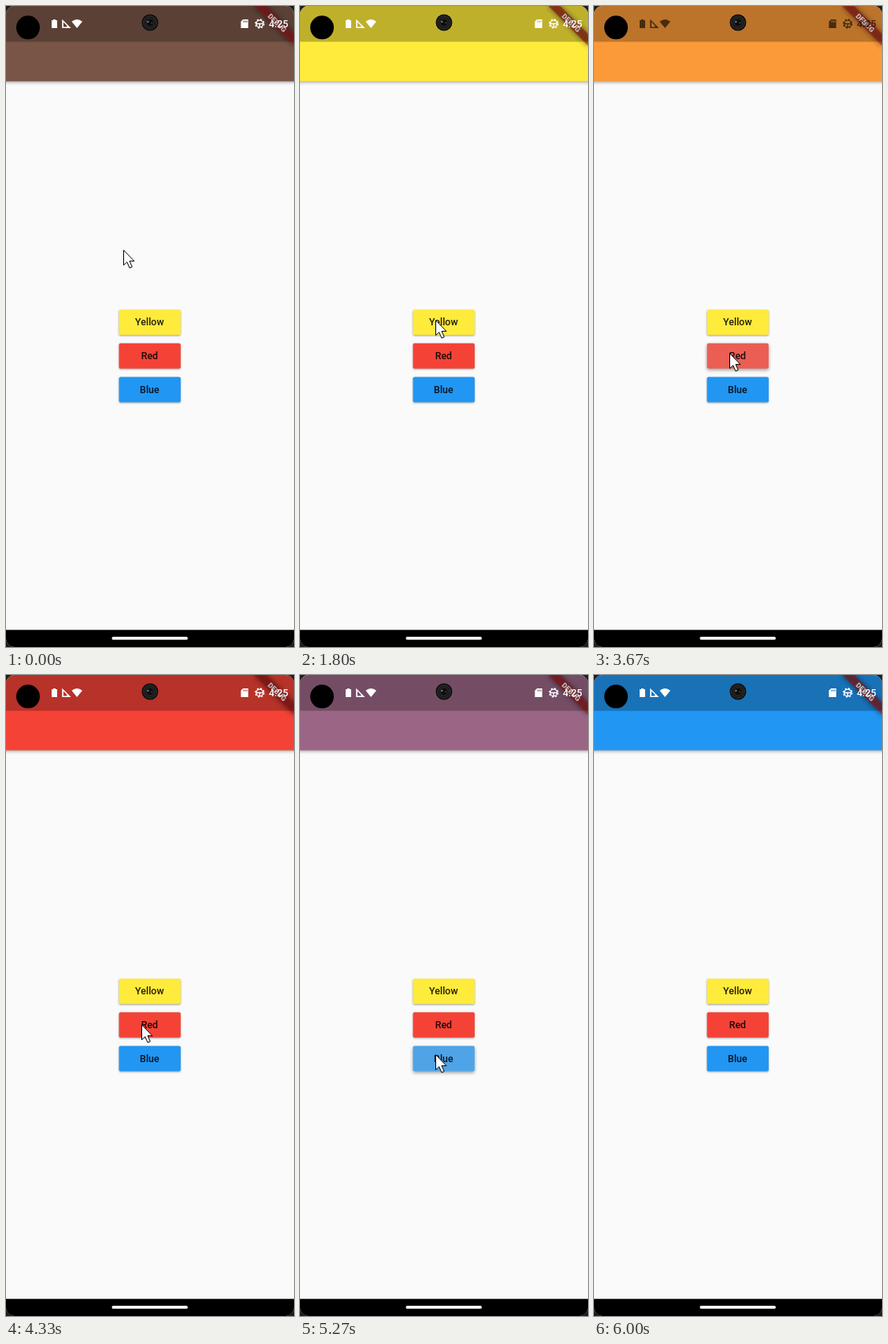
Recreate the animation shown at these times as an HTML page. Size 366 by 813 pixels, loop 6.94 s.

```html
<!DOCTYPE html>
<html lang="en">
<head>
<meta charset="utf-8">
<style>
  html, body { margin: 0; width: 100%; height: 100%; overflow: hidden; background: #1c1c1c; }
  svg { display: block; width: 366px; height: 813px; }
  text { font-family: Roboto, sans-serif; font-weight: 500; text-anchor: middle; }
  #bar { filter: drop-shadow(0 1.5px 2px rgb(0 0 0 / .4)); }
  .label { font-size: 12.46px; fill: rgb(0 0 0 / .87); }
  .debug { font-size: 9.1px; font-weight: 900; fill: #fff; }
  .clock { font-size: 12.6px; }
</style>
</head>
<body>
<svg viewBox="0 0 366 813">
  <defs>
    <clipPath id="screen"><rect width="366" height="813" rx="11"/></clipPath>
    <filter id="soft" x="-30%" y="-150%" width="160%" height="400%"><feGaussianBlur stdDeviation="3.5"/></filter>
  </defs>
  <g clip-path="url(#screen)">
    <rect width="366" height="813" fill="#fafafa"/>
    <rect id="bar" x="-8" y="-8" width="382" height="103.5"/>
    <g id="buttons"></g>

    <g transform="translate(366 0) rotate(45)">
      <rect x="-35.6" y="24.9" width="71.2" height="10.7" opacity=".5" filter="url(#soft)"/>
      <rect x="-35.6" y="24.9" width="71.2" height="10.7" fill="#b71c1c" fill-opacity=".627"/>
      <text class="debug" y="33.5">DEBUG</text>
    </g>

    <rect width="366" height="45.4" opacity=".25"/>
    <g id="icons">
      <path d="M60 17h3v1h2v10h-7V18h2z"/>
      <path fill-rule="evenodd" d="M71.3 16.7V28h11.3zM73 20.4v6h4.5v-1.5z"/>
      <path d="M83.5 19.8Q90.2 14.4 97 19.8L90.2 28z"/>
      <path fill-rule="evenodd" d="M301.2 17h6.6v11h-9.3v-8.3zM301.6 18.5v2.2h1v-2.2zm2 0v2.2h1v-2.2zm2 0v2.2h1v-2.2z"/>
      <g fill="none" stroke-width="1.4">
        <circle cx="322.4" cy="22.5" r="4.4"/>
        <circle cx="322.4" cy="22.5" r="5.5" stroke-dasharray="2.2 2.12"/>
        <path d="M318 22.5h8.8M322.4 22.5v4.4"/>
      </g>
      <text class="clock" x="346.3" y="27.3" stroke="none">4:25</text>
    </g>

    <circle cx="28" cy="27.3" r="15"/>
    <circle cx="183" cy="21" r="10.5" fill="#0c0c0c"/>
    <circle cx="183" cy="21" r="8.4" fill="#1c1c1c" stroke="#303030"/>
    <circle cx="183" cy="21" r="5" fill="#0d0d0d" stroke="#2b2b2b"/>
    <circle cx="180.4" cy="20" r="1.2" fill="#777"/>
    <circle cx="185.4" cy="21.5" r=".8" fill="#666"/>

    <rect y="791.3" width="366" height="22"/>
    <rect x="134.5" y="800" width="96.5" height="3.8" rx="1.9" fill="#fff"/>
    <path id="cursor" d="M.5 .7V19.7L4.8 15.8 8 23.2 11.3 21.8 8.1 14.6H14z" fill="#fff" stroke="#000"/>
  </g>
</svg>
<script>
const LOOP = 6940, STEP = 1000 / 15;
const brown = [121, 85, 72], yellow = [255, 235, 59], red = [244, 67, 54], blue = [33, 150, 243];
const grey = [200, 200, 200], white = [255, 255, 255, 1], dark = [0, 0, 0, .62];

const $ = id => document.getElementById(id);
const clamp = x => Math.min(1, Math.max(0, x));
const progress = (k, from, to) => clamp((k - from) / (to - from));
const smooth = p => p * p * (3 - 2 * p);
const mix = (a, b, p) => a.map((v, i) => v + (b[i] - v) * p);
const css = c => `rgb(${c.slice(0, 3).join(' ')} / ${c[3] ?? 1})`;

const buttons = [['Yellow', yellow], ['Red', red], ['Blue', blue]].map(([name, color], i) => {
  const y = 385.2 + i * 42.65;
  $('buttons').insertAdjacentHTML('beforeend',
    `<rect x="143.6" y="${y}" width="78.3" height="32" rx="1.8"/>
     <text class="label" x="182.4" y="${y + 20.2}">${name}</text>`);
  return { color, rect: $('buttons').querySelectorAll('rect')[i] };
});

function paintButton({ color, rect }, splash, lift) {
  rect.setAttribute('fill', css(mix(color, grey, splash)));
  rect.style.filter =
    `drop-shadow(0 ${1.2 + 1.6 * lift}px ${1.1 + 1.2 * lift}px rgb(0 0 0 / .38))`;
}

function barColor(k) {
  if (k < 27) return brown;
  if (k < 55) return yellow;
  if (k < 79) return mix(yellow, red, [.48, .9][k - 55] ?? 1);
  return mix(red, blue, [.42, .88][k - 79] ?? 1);
}

function cursorAt(k) {
  if (k < 37) return mix([149, 309], [172, 398], smooth(progress(k, 0, 9)));
  if (k < 84) return [172, 398 + 42 * smooth(progress(k, 37, 45)) + 41 * smooth(progress(k, 64, 70))];
  return mix([172, 481], [120, 861], progress(k, 84, 90) ** 2);
}

function draw(time) {
  // The screen refreshes 15 times a second.
  const k = Math.floor((time % LOOP + 5) / STEP);
  $('bar').setAttribute('fill', css(barColor(k)));

  const tint = css(mix(white, dark, progress(k, 28, 31) - progress(k, 56, 60)));
  $('icons').setAttribute('fill', tint);
  $('icons').setAttribute('stroke', tint);
  $('icons').setAttribute('stroke-width', 0);

  paintButton(buttons[0], 0, 0);
  paintButton(buttons[1], [.2, .2, .12, .05][k - 55] ?? 0, k < 50 ? 0 : 1 - progress(k, 56, 59));
  paintButton(buttons[2], [.2, .27, .13][k - 78] ?? 0, k < 77 ? 0 : 1 - progress(k, 79, 81));

  $('cursor').setAttribute('transform', `translate(${cursorAt(k).map(Math.round)})`);
  $('cursor').setAttribute('visibility', k < 90 ? 'visible' : 'hidden');
}

const start = performance.now();
function tick() {
  draw(performance.now() - start);
  requestAnimationFrame(tick);
}
tick();
</script>
</body>
</html>
```
